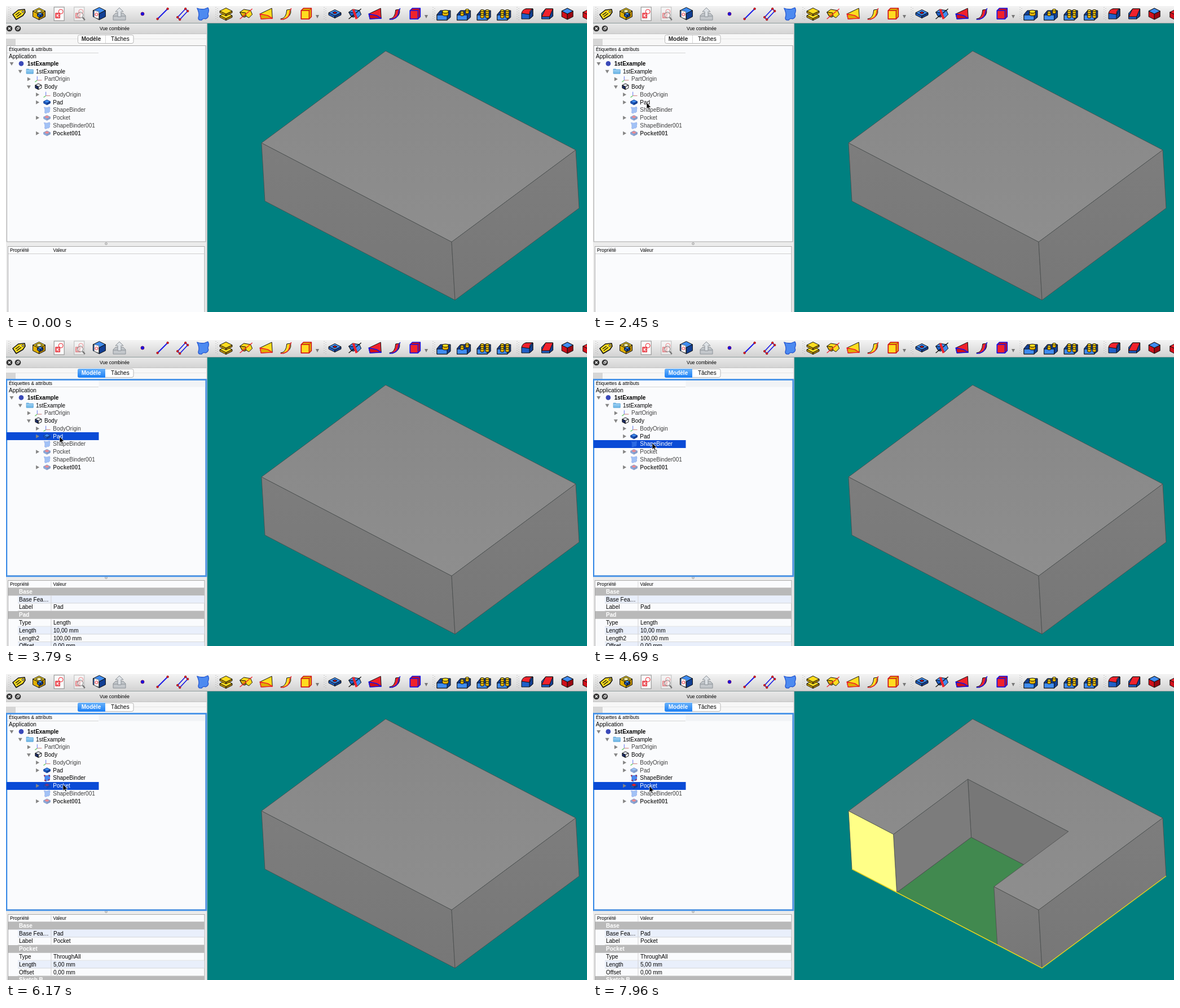
These frames come from a looping animation (1030 by 544 pixels, 8000 ms). An HTML page:

```html
<!DOCTYPE html>
<html lang="fr">
<head>
<meta charset="utf-8">
<title>Vue combinée</title>
<style>
html, body { margin: 0; height: 100%; overflow: hidden; background: #008080; }
svg { display: block; }
text { font-family: "Liberation Sans", Arial, sans-serif; white-space: pre; }
</style>
</head>
<body>
<svg width="1030" height="544" viewBox="0 0 1030 544">
  <defs>
    <linearGradient id="barFill" x2="0" y2="1"><stop stop-color="#f4f4f4"/><stop offset="1" stop-color="#d2d2d2"/></linearGradient>
    <linearGradient id="titleFill" x2="0" y2="1"><stop stop-color="#e8e8e8"/><stop offset="1" stop-color="#d4d4d4"/></linearGradient>
    <linearGradient id="tabFill" x2="0" y2="1"><stop stop-color="#69b2fa"/><stop offset="1" stop-color="#1a7ff6"/></linearGradient>
    <linearGradient id="topFill" x2="0" y2="1"><stop stop-color="#878787"/><stop offset="1" stop-color="#8e8e8e"/></linearGradient>
    <linearGradient id="sideFill" x2="0" y2="1"><stop stop-color="#7d7d7d"/><stop offset="1" stop-color="#777"/></linearGradient>
  </defs>
  <g id="still"></g>
  <g id="live"></g>
</svg>
<script>
const LOOP = 8000, TICK = 150, ROW = 13.77;
// Top, left and right shades
const YELLOW = ['#ffdc1f', '#e0ae00', '#b98a00'], RED = ['#f0222c', '#d00f1a', '#9a0812'], BLUE = ['#3f8cf0', '#1f5fc8', '#123f94'];
const INK = '#111', PEN = '#1414e6';

// Drawing helpers
const path = (d, fill = 'none', stroke = INK, w = 1) =>
  `<path d="${d}" fill="${fill}" stroke="${stroke}" stroke-width="${w}" stroke-linejoin="round"/>`;
const poly = (pts, fill, stroke, w) => path(`M${pts}Z`, fill, stroke, w);
const rect = (x, y, w, h, fill, extra = '') =>
  `<rect x="${x}" y="${y}" width="${w}" height="${h}" fill="${fill}" ${extra}/>`;
const dot = (x, y, r, fill, stroke = 'none') =>
  `<circle cx="${x}" cy="${y}" r="${r}" fill="${fill}" stroke="${stroke}"/>`;
const text = (x, y, s, { size = 10, fill = '#000', bold, mid } = {}) =>
  `<text x="${x}" y="${y}" font-size="${size}" fill="${fill}"${bold ? ' font-weight="700"' : ''}${mid ? ' text-anchor="middle"' : ''}>${s}</text>`;
const at = (x, y, s, scale = 1, opacity = 1) =>
  `<g transform="translate(${x} ${y}) scale(${scale})" opacity="${opacity}">${s}</g>`;

// Isometric block: top centre, half width, height
const rhomb = (x, y, r, fill, stroke) => poly(`${x - r},${y} ${x},${y - r / 2} ${x + r},${y} ${x},${y + r / 2}`, fill, stroke);
const iso = (x, y, r, h, c, stroke = INK) => rhomb(x, y, r, c[0], stroke) +
  [-r, r].map((e, i) => path(`M${x + e},${y}v${h}L${x},${y + r / 2 + h}v${-h}Z`, c[i + 1], stroke)).join('');

// Toolbar icons, centred on 0,0
const tag = poly('-11,1 -1,-7 10,-8 11,-3 7,3 -5,10', YELLOW[0], INK, 1.6) + dot(7, -4, 1.6, '#fff', INK) +
  path('M-6,2L1,-3M-4,5L4,-1', 'none', INK, 1.4);
const body = iso(0, -5, 11, 10, YELLOW) + rhomb(0, -5, 6, '#fff6b0') + iso(2, 0, 5, 4, BLUE);
const page = rect(-9, -12, 18, 24, '#fafafa', 'stroke="#888"') + rect(-6, -1, 7, 8, 'none', 'stroke="#e3121d" stroke-width="1.4"') +
  dot(3, -4, 4, 'none', RED[0]) + dot(-3, 3, 2.5, 'none', RED[0]);
const lens = at(0, 0, page, 1, .5) + dot(2, 2, 5, '#ffffff66', '#777') + path('M6,6L10,11', 'none', '#777', 2.5);
const mapped = iso(0, -6, 11, 11, BLUE) + poly('-9,-6 -1,-4 -1,9 -9,6', '#fff', '#777') + dot(-5, 1, 2.5, 'none', RED[0]);
const tray = path('M-11,3L-7,-1H7L11,3V11H-11ZM-11,4H11', '#c3c7cb', '#8a9096') +
  path('M-3,5V-4H-7L0,-11L7,-4H3V5Z', '#dde1e5', '#8a9096');
const ends = (...p) => p.map(([x, y]) => dot(x, y, 1.7, RED[0], RED[2])).join('');
const point = dot(0, 0, 3, PEN, '#701070');
const line = path('M-9,9L9,-9', 'none', PEN, 1.8) + ends([-9, 9], [9, -9]);
const frame = path('M-9,6L5,-9L9,-5L-5,10Z', 'none', PEN, 1.6) + ends([-9, 6], [5, -9], [9, -5], [-5, 10]);
const binder = path('M-10,-10Q0,-6 9,-11Q12,-7 9,0Q12,6 5,9Q1,7 -2,11Q-10,12 -7,4Q-6,-2 -10,-10Z', '#4d8af0', '#2456d0', 1.3);
const pad = iso(0, 3, 11, 3, YELLOW) + iso(0, -5, 11, 3, YELLOW);
const revolve = (c, pen) => path('M-11,-3L-4,-8L8,-6L11,1L5,7L0,4Q-2,8 -7,4Z', c[0]) + path('M-11,-3L-1,-2L0,4L-7,4Z', c[1]) +
  path('M-11,9L11,-9', 'none', pen, 1.4);
const loft = (c, pen) => poly('-11,0 10,-10 11,8 -9,9', c[0]) + poly('-11,0 3,3 11,8 -9,9', c[1], pen, 1.5);
const sweep = (c, pen) => path('M-10,9Q0,8 1,-7L8,-8Q10,5 -5,10Z', c[0]) + path('M-10,10Q6,9 6,-4L9,-10', 'none', pen, 1.5);
const cube = (c, pen) => path('M-9,-6L-5,-10H9V5L5,9H-9Z', c[1], pen, 1.5) + path('M-9,-6H5V9H-9Z', c[0], pen, 1.5) + path('M5,-6L9,-10', 'none', pen);
const pocket = iso(0, -2, 11, 4, BLUE) + rhomb(0, -2, 4, RED[1]);
const groove = revolve(BLUE, INK) + path('M-3,-8L3,9', 'none', RED[0], 4);
const post = (x, y, r) => path(`M${x - r},${y}v5a${r},${r / 2} 0 0 0 ${2 * r},0v-5`, YELLOW[1]) +
  `<ellipse cx="${x}" cy="${y}" rx="${r}" ry="${r / 2}" fill="${YELLOW[0]}" stroke="${INK}"/>`;
const pattern = n => poly('-12,1 -6,-6 12,-6 12,6 6,11 -12,11', BLUE[2]) + rect(-12, 2, 18, 9, BLUE[0], `stroke="${INK}"`) +
  Array.from({ length: n }, (_, i) => n === 1 ? post(3, -4, 5.5) : post(i % 2 * 9 - 3, (i >> 1) * 7 - 6 + (n === 2 ? 3 - i * 4 : 0), 3.2)).join('');
const dressed = edge => path('M-10,-1L-3,-9H10V4L4,9H-10Z', BLUE[1]) + path('M4,1L10,-9V4L4,9Z', BLUE[2]) + path(edge, RED[0]);
const draft = iso(0, -5, 10, 10, RED) + rhomb(0, -5, 10, BLUE[0]);

const groups = [
  [23, tag, body, page, lens, mapped, tray], [242, point, line, frame, binder],
  [390, pad, revolve(YELLOW, RED[0]), loft(YELLOW, RED[0]), sweep(YELLOW, RED[0]), cube(YELLOW, RED[1])],
  [583, pocket, groove, loft(RED, PEN), sweep(RED, PEN), cube(RED, PEN)],
  [776, ...[1, 2, 4, 4].map(pattern)],
  [924, dressed('M-10,-1Q-8,-9 -1,-9H10Q4,-7 4,1Z'), dressed('M-10,5L-3,-9H10L4,5Z'), draft, iso(2, -3, 10, 9, RED)]];
const grip = x => `<path d="M${x},2V26M${x + 3},4V28" stroke="#aaa" stroke-dasharray="1 3"/>`;
const small = { size: 8.35 };

still.innerHTML =
  rect(357, 30, 673, 514, '#008080') + rect(0, 0, 1030, 30, 'url(#barFill)') + rect(0, 30, 1030, 1, '#8f9c9c') +
  [5, 372, 564, 757, 906].map(grip).join('') +
  groups.map(([x, ...icons]) => icons.map((icon, i) => at(x + i * 35.6, 14, icon)).join('')).join('') +
  [552, 745].map(x => poly(`${x - 3},16 ${x + 3},16 ${x},22`, '#777', 'none')).join('') +
  rect(0, 31, 357, 513, '#ececec') + rect(0, 31, 357, 18, 'url(#titleFill)') + rect(0, 49, 357, 1, '#c4c4c4') +
  rect(0, 50, 357, 20, '#f7f7f7') + rect(0, 58, 17, 12, '#d6d6d6') + rect(17, 58, 338, .7, '#ddd') +
  dot(6, 40, 5.3, '#333') + path('M4,38L8,42M8,38L4,42', 'none', '#fff', 1.4) +
  dot(21, 40, 5.3, '#333') + path('M19,39H22V42H19ZM20.5,39V37.5H23.5V40.5H22', 'none', '#fff', .9) +
  text(192.5, 43, 'Vue combinée', { size: 8.35, mid: true }) +
  rect(1.5, 70.5, 352.5, 348.5, '#fafbfd', 'stroke="#a9a9a9"') +
  text(5, 80, 'Étiquettes &amp; attributs', small) + rect(2, 83, 162, 1, '#d5d5d5') +
  dot(177.5, 422.5, 2, '#d2d2d2', '#aaa') +
  rect(3.5, 427.5, 348.5, 120, '#fafbfd', 'stroke="#a9a9a9"') +
  rect(355.5, 31, 1.5, 513, '#c4c4c4');

// Tree icons
const axes = path('M-2,2V-5', 'none', '#7c8cf0', 1.2) + path('M-2,2L-6,5', 'none', '#65c865', 1.4) + path('M-2,2H6', 'none', '#d08a8a', 1.2);
const folder = path('M-6,-4H-2L-1,-3H6V4H-6Z', '#79bdea', '#5aa5d8') + rect(-6, -1.5, 12, 1, '#b9defa');
const bodyIcon = iso(0, -3, 5.5, 5, ['#e9eefb', '#1d2f6b', '#fff']);
const padIcon = iso(0, -1.5, 5.8, 3, BLUE, BLUE[2]);
const pocketIcon = iso(0, -1.5, 5.8, 3, BLUE, BLUE[2]) + rhomb(0, -1.5, 3.6, RED[0], RED[1]);
const binderIcon = at(0, 0, binder + ends([-8, -8], [8, -8], [7, 6], [-6, 8]), .52);
const binderPale = at(0, 0, binder, .52, .5);
const arrow = (x, y, open) => at(x, y, `<g transform="rotate(${open ? 90 : 0})">${poly('-2.5,-3.5 3.5,0 -2.5,3.5', '#858585', 'none')}</g>`);

function tree({ sel, binderOn, cut }) {
  // depth, label, icon, arrow (1 open, 0 closed, -1 none), dimmed, bold
  const rows = [
    [0, '1stExample', dot(0, 0, 4.3, '#3a49b8'), 1, 0, 1],
    [1, '1stExample', folder, 1],
    [2, 'PartOrigin', axes, 0, 1],
    [2, 'Body', bodyIcon, 1],
    [3, 'BodyOrigin', axes, 0, 1],
    [3, 'Pad', padIcon, 0, cut],
    [3, 'ShapeBinder', binderOn ? binderIcon : binderPale, -1, !binderOn],
    [3, 'Pocket', pocketIcon, 0, !cut],
    [3, 'ShapeBinder001', binderPale, -1, 1],
    [3, 'Pocket001', pocketIcon, 0, 1, 1]];
  return text(5, 92.7, 'Application') + rows.map(([depth, label, icon, open, dim, bold], i) => {
    const x = 10 + depth * 15.2, y = 102.4 + i * ROW, on = label === sel;
    const pale = dim && (icon === padIcon || icon === pocketIcon);
    return (on ? rect(1, Math.round(y - 7), 163.5, 14, '#0a4bd6') : '') +
      (open >= 0 ? arrow(x, y, open) : '') + at(x + 17, y, icon, 1, pale ? .5 : 1) +
      text(x + 27.7, y + 3.4, label, { fill: on ? '#fff' : dim ? '#3f3f3f' : '#000', bold });
  }).join('');
}

const tables = {
  Pad: ['Base', ['Base Fea…', ''], ['Label', 'Pad'], 'Pad', ['Type', 'Length'], ['Length', '10,00 mm'], ['Length2', '100,00 mm'], ['Offset', '0,00 mm']],
  ShapeBinder: ['Base', ['Label', 'ShapeBinder']],
  Pocket: ['Base', ['Base Fea…', 'Pad'], ['Label', 'Pocket'], 'Pocket', ['Type', 'ThroughAll'], ['Length', '5,00 mm'], ['Offset', '0,00 mm'], 'Sketch B…']
};

function properties(name) {
  let out = '';
  if (name) for (let i = 0; i < 8; i++) {
    const row = tables[name][i], y = 440.7 + i * ROW, line = y + 10.2, left = row ? 21 : 4;
    if (typeof row === 'string') {
      out += rect(4, y, 347.5, ROW, '#b9b9b9') + text(23, line, row, { fill: '#fff', bold: true });
      continue;
    }
    if (i % 2) out += rect(left, y, 351.5 - left, ROW, '#e9effb');
    if (row) out += rect(21, y + ROW - .8, 330.5, .8, '#cfcfcf') + rect(79.5, y, .9, ROW, '#cfcfcf') +
      text(23, line, row[0]) + text(84, line, row[1]);
  }
  return out + rect(4, 440, 347.5, .8, '#c4c4c4') + (name ? rect(79.5, 429, .8, 11, '#d0d0d0') : '') +
    text(7, 437, 'Propriété', small) + text(83.5, 437, 'Valeur', small);
}

// Block corners: u along the long edge, v along the short one, w downwards
const corner = ([u, v, w = 0]) => [673 + 337 * u - 220 * v + 6 * w, 80 + 176 * u + 163.5 * v + 103.3 * w];
const face = (fill, ...pts) => poly(pts.map(corner).join(' '), fill, '#4a4a4a', .75);
const wall = (fill, [a, b], [c, d]) => face(fill, [a, b], [c, d], [c, d, 1], [a, b, 1]);

function solid(cut) {
  const right = wall('url(#sideFill)', [1, 0], [1, 1]);
  if (!cut) return face('url(#topFill)', [0, 0], [1, 0], [1, 1], [0, 1]) + wall('url(#sideFill)', [0, 1], [1, 1]) + right;
  const a = .236, b = .765, c = .4;   // notch sides and back
  return face('#41894f', [a, 1, 1], [a, c, 1], [b, c, 1], [b, 1, 1]) +
    wall('#777', [a, c], [b, c]) + wall('#7c7c7c', [a, 1], [a, c]) +
    face('url(#topFill)', [0, 0], [1, 0], [1, 1], [b, 1], [b, c], [a, c], [a, 1], [0, 1]) +
    wall('#ffff87', [0, 1], [a, 1]) + wall('url(#sideFill)', [b, 1], [1, 1]) + right +
    path('M' + [[0, 1, 1], [1, 1, 1], [1, 0, 1]].map(corner).join('L'), 'none', '#ead91c', 1.4);
}

const tabs = active => rect(127.5, 51.5, 98.5, 15, '#fff', 'rx="3" stroke="#b5b5b5"') +
  (active ? path('M176,51H130Q127,51 127,54V64Q127,67 130,67H176Z', 'url(#tabFill)', 'none') : rect(176, 52, .8, 14, '#ccc')) +
  text(151, 62.4, 'Modèle', { bold: true, mid: true, fill: active ? '#fff' : '#222' }) + text(202.3, 62.4, 'Tâches', { mid: true });

// Focus ring, glow from 0 to 1
const ring = glow => rect(164.5, 72, 189, 11.5, '#f1f3f6') +
  rect(.9, 70.5, 354, 349.3, 'none', `stroke="#4592e8" stroke-opacity="${.55 + .45 * glow}" stroke-width="${1.8 + glow}"`);
const pointer = ([x, y]) => at(x, y, path('M0,0V11.5L2.6,9.2L4.5,13.2L6.3,12.4L4.5,8.5H8Z', '#000', '#fff', .7));

// Pointer legs: start, end, where to, easing
const out = p => 1 - (1 - p) ** 3, slowStart = p => p ** 3, linear = p => p;
const legs = [[500, 1410, 76, 172, out], [1410, 1560, 81, 171, linear], [1850, 2450, 95, 171.5, out],
  [4540, 4690, 105, 183, linear], [4690, 5870, 101, 196, slowStart], [7810, 7960, 100, 199, linear]];

function pointerAt(t) {
  if (t < 500) return null;
  let x = 634, y = 421;
  for (const [t0, t1, toX, toY, ease] of legs) {
    if (t < t0) break;
    // positions are held for one tick
    const p = t >= t1 ? 1 : ease(Math.floor((t - t0) / TICK) * TICK / (t1 - t0));
    x += (toX - x) * p;
    y += (toY - y) * p;
  }
  return [x, y];
}

const last = (t, steps) => steps.findLast(([start]) => start <= t)?.[1];
const clicks = [[3040, 'Pad'], [4690, 'ShapeBinder'], [6170, 'Pocket']];
const shows = [[3040, 'Pad'], [4840, 'ShapeBinder'], [6170, 'Pocket']];

function stateAt(t) {
  const age = t - (t < 4840 ? 3040 : 4840);
  return {
    sel: last(t, clicks), table: last(t, shows), cursor: pointerAt(t),
    glow: age < 600 ? 0 : age < 750 ? .5 : 1,
    binderOn: t >= 5570, cut: t >= 6910
  };
}

let shown;
const start = performance.now();
function draw() {
  const s = stateAt((performance.now() - start) % LOOP), id = JSON.stringify(s);
  if (id !== shown) {
    shown = id;
    live.innerHTML = solid(s.cut) + tabs(s.sel) + (s.sel ? ring(s.glow) : '') + tree(s) + properties(s.table) +
      (s.cursor ? pointer(s.cursor) : '');
  }
  requestAnimationFrame(draw);
}
draw();
</script>
</body>
</html>
```
